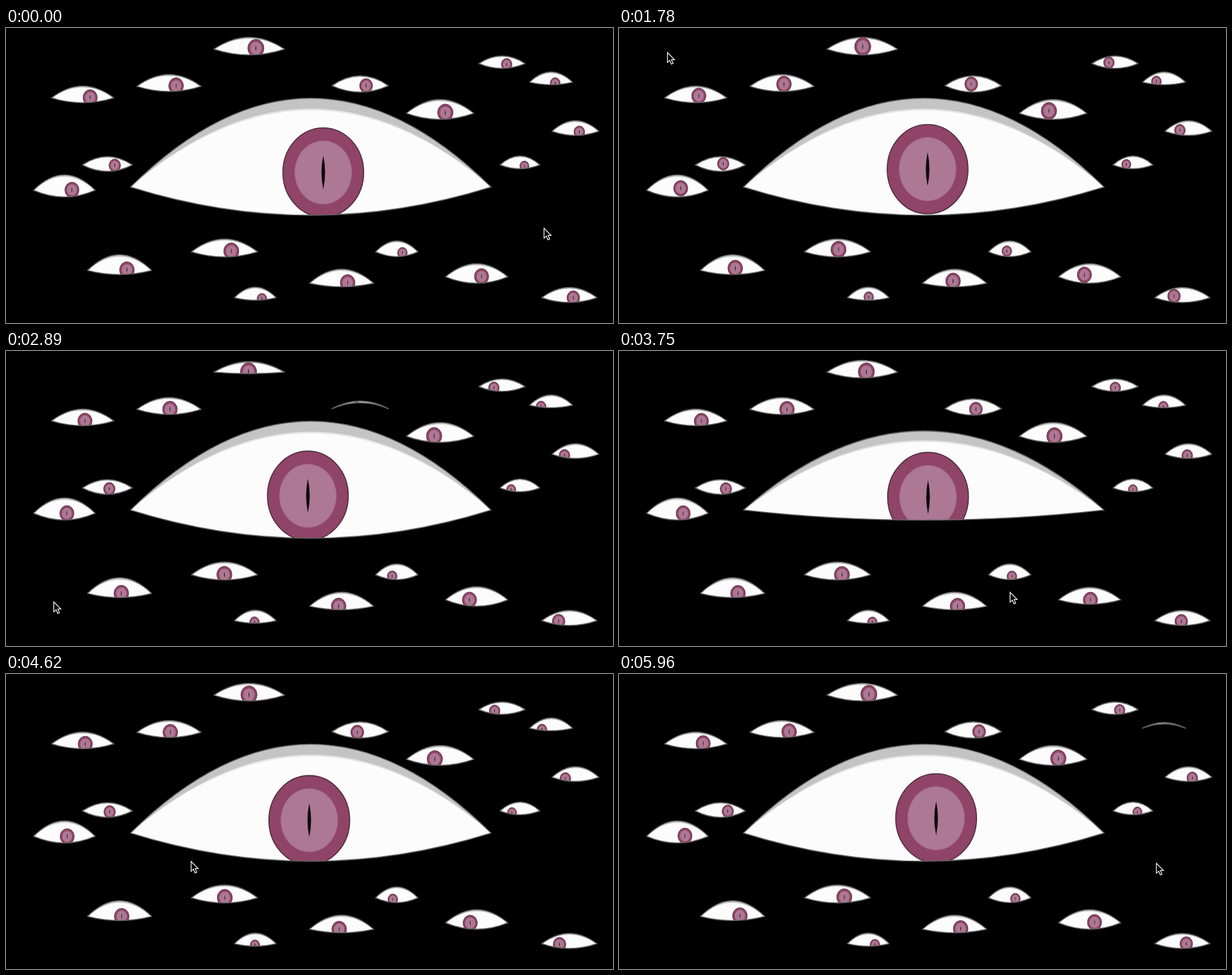
An HTML page with a canvas for the animation above (6060 ms loop, 946 px wide and 460 px high).

```html
<!DOCTYPE html>
<html lang="en">
<head>
<meta charset="utf-8">
<title>Watching eyes</title>
<style>
  html, body { margin: 0; width: 100%; height: 100%; overflow: hidden; background: #000; }
  canvas { display: block; }
</style>
</head>
<body>
<canvas id="stage" width="946" height="460"></canvas>
<script>
const ctx = document.getElementById('stage').getContext('2d');
const LOOP = 6060;
const BLINK = 160;

// Layout: centre x, corner y, width, rise of the upper lid, drop of the lower lid,
// and for some the moment of a blink
const eye = (x, y, w, up, down, blink = -LOOP) =>
  ({ x, y, up, down, blink, left: x - w / 2, right: x + w / 2, r: 0.114 * w });

const mainEye = eye(475, 248, 562, 138.5, 44, 3873);
const smallEyes = [
  eye(379, 33, 110, 18.5, 9, 3000),
  eye(773, 55.5, 72, 12, 7.5),
  eye(849.5, 84.5, 67, 16, 4, 5960),
  eye(887.5, 161, 73, 16.5, 6.5, 2300),
  eye(119.5, 109, 97, 18.5, 7.5, 4950),
  eye(254, 91, 100, 18.5, 8),
  eye(552, 90, 88, 15.5, 10, 2890),
  eye(676.5, 133, 105, 21.5, 9.5),
  eye(158, 213.5, 78, 13, 10),
  eye(91, 253, 96, 24, 10.5, 3500),
  eye(801, 213.5, 62, 14, 6),
  eye(177, 378, 100, 24.5, 6.5),
  eye(340.5, 349, 103, 20, 8),
  eye(609, 349, 66, 17, 7.5),
  eye(523, 398, 100, 22, 5.5),
  eye(388.5, 420.5, 65, 16.5, 4),
  eye(733.5, 388, 97, 20.5, 10, 3890),
  eye(878, 420.5, 86, 16, 7.5)
];

// Stops of the pointer: time, x, y
const stops = [
  [0, 838, 312], [500, 908, 190], [820, 812, 71], [1300, 780, 45], [1780, 75, 38],
  [2050, 57, 60], [2890, 74, 391], [3240, 50, 410], [3680, 650, 385], [3750, 609, 376],
  [4300, 42, 420], [4540, 45, 420], [4620, 288, 292], [5500, 850, 230], [5960, 837, 295],
  [LOOP, 838, 312]
];

function pointerAt(time) {
  const t = (time + LOOP) % LOOP;
  const i = stops.findIndex(stop => stop[0] > t);
  const [t0, x0, y0] = stops[i - 1], [t1, x1, y1] = stops[i];
  const s = (t - t0) / (t1 - t0);
  const e = s * s * (3 - 2 * s);
  return { x: x0 + (x1 - x0) * e, y: y0 + (y1 - y0) * e };
}

// The gaze trails the pointer: an exponentially weighted mean of its past,
// scaled to 0..1 across the area it roams
function gazeAt(t, lag) {
  const n = 40;
  let x = 0, y = 0;
  for (let i = 0; i < n; i++) {
    const p = pointerAt(t + lag * Math.log((i + 0.5) / n));
    x += p.x / n;
    y += p.y / n;
  }
  const unit = v => Math.min(1, Math.max(0, v));
  return { x: unit((x - 74) / 764), y: unit((y - 40) / 360) };
}

function lens(e, up, down) {
  ctx.beginPath();
  ctx.moveTo(e.left, e.y);
  ctx.quadraticCurveTo(e.x, e.y - 2 * up, e.right, e.y);
  ctx.quadraticCurveTo(e.x, e.y + 2 * down, e.left, e.y);
  ctx.closePath();
}

function fillLens(e, up, down, color) {
  lens(e, up, down);
  ctx.fillStyle = color;
  ctx.fill();
}

function ellipse(x, y, rx, ry, color) {
  ctx.beginPath();
  ctx.ellipse(x, y, rx, ry, 0, 0, 2 * Math.PI);
  ctx.fillStyle = color;
  ctx.fill();
}

function iris(x, y, r) {
  ellipse(x, y, r, r * 1.105, '#8f4468');
  ctx.strokeStyle = '#4c2c3c';
  ctx.lineWidth = Math.max(0.9, 0.025 * r);
  ctx.stroke();
  ellipse(x, y, 0.71 * r, 0.79 * r, '#a66d8b');
  ellipse(x, y, 0.69 * r, 0.77 * r, '#ad7894');
  const w = Math.max(1.1, 0.09 * r), h = 0.42 * r;
  ctx.beginPath();
  ctx.moveTo(x, y - h);
  ctx.quadraticCurveTo(x + w, y, x, y + h);
  ctx.quadraticCurveTo(x - w, y, x, y - h);
  ctx.fillStyle = '#0e080c';
  ctx.fill();
}

// Both lids meet on an arch below the upper lid, leaving a thin slit
function drawEye(e, t, x, y, r) {
  const shut = Math.min(0.9, Math.max(0, 1 - Math.abs(t - e.blink) / BLINK));
  const closed = 0.35 * e.up + 0.6 * e.down;
  const up = e.up + (closed - e.up) * shut;
  const down = e.down - (closed + e.down) * shut;
  ctx.save();
  fillLens(e, up, down, '#c4c4c4');
  ctx.clip();
  fillLens(e, up * 0.882, e.down, '#e6e6e6');
  fillLens(e, up * 0.862, e.down, '#fcfcfc');
  iris(x, y, r);
  ctx.restore();
  lens(e, up, down);
  ctx.strokeStyle = '#626262';
  ctx.lineWidth = 1.6;
  ctx.lineJoin = 'round';
  ctx.stroke();
}

const arrow = new Path2D('M0 0V15.4L3.6 12.1 6.1 18 8.8 16.9 6.3 11.1H11Z');
function drawPointer({ x, y }) {
  ctx.save();
  ctx.translate(x + 0.5, y + 0.3);
  ctx.fillStyle = '#000';
  ctx.fill(arrow);
  ctx.strokeStyle = '#fff';
  ctx.lineWidth = 1.2;
  ctx.lineJoin = 'miter';
  ctx.stroke(arrow);
  ctx.restore();
}

function draw(t) {
  ctx.fillStyle = '#000';
  ctx.fillRect(0, 0, 946, 460);

  const slow = gazeAt(t, 280);
  drawEye(mainEye, t, 470.5 + 24.5 * slow.x, 220 + 8 * slow.y, 63);

  const quick = gazeAt(t, 110);
  for (const e of smallEyes) {
    // Eyes further right swing wider
    const reach = 12 - 0.0023 * e.x - 0.000005 * e.x ** 2;
    const range = 7.2 + 0.006 * e.x + 0.0000135 * e.x ** 2;
    const x = e.x + reach - range * (1 - quick.x);
    const y = e.y + 0.6 * (11.8 - e.r) - 3.6 * (1 - quick.y);
    drawEye(e, t, x, y, e.r);
  }
  drawPointer(pointerAt(t));
}

const start = performance.now();
function frame() {
  draw((performance.now() - start) % LOOP);
  requestAnimationFrame(frame);
}
frame();
</script>
</body>
</html>
```
